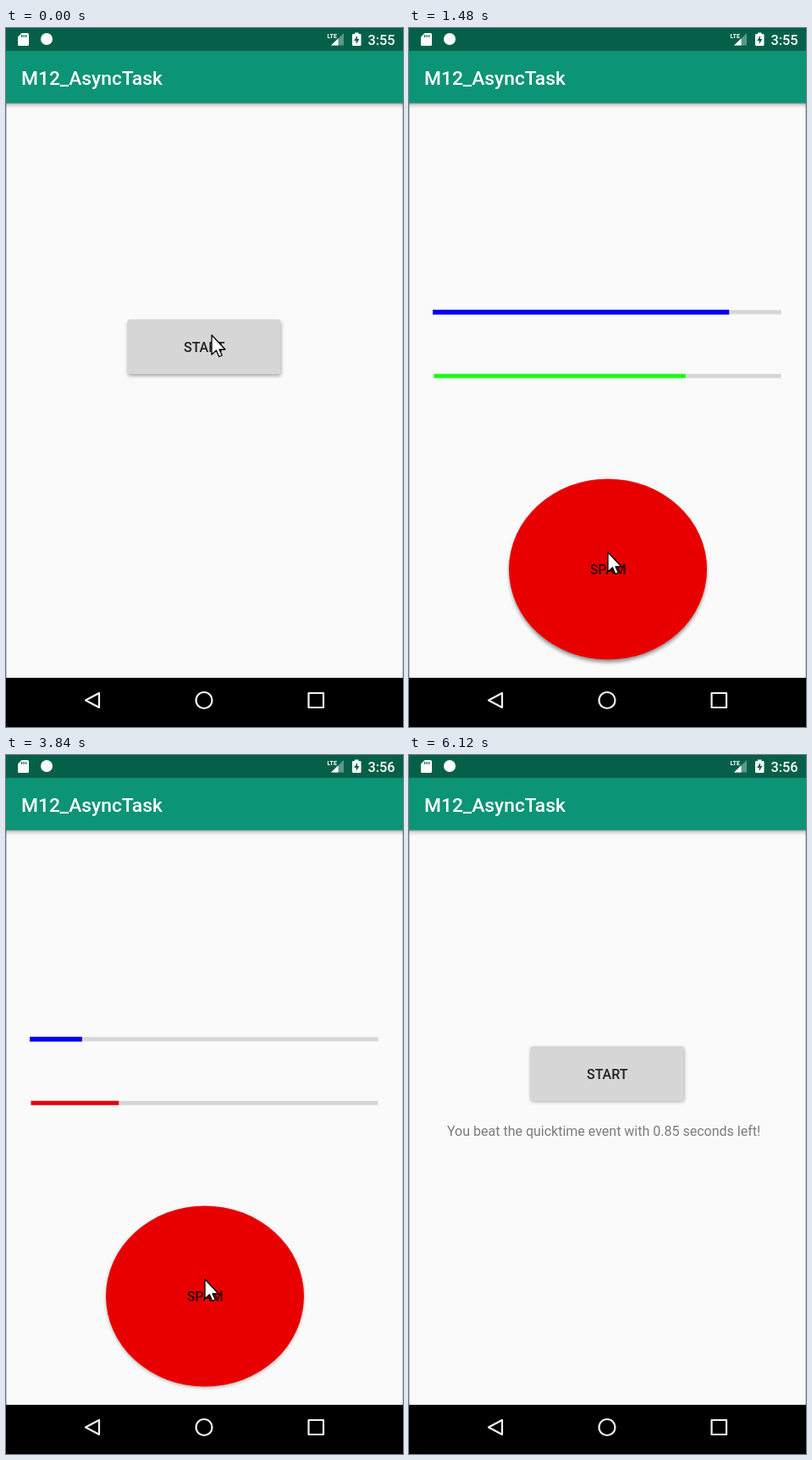
Write an HTML page that moves like this. It is 469 px wide and 824 px high and loops after 6160 ms.

```html
<!DOCTYPE html>
<html lang="en">
<head>
<meta charset="utf-8">
<title>AsyncTask demo</title>
<style>
  html, body { margin: 0; width: 100%; height: 100%; overflow: hidden; background: #fafafa; }
  svg { display: block; width: 469px; height: 824px; font-family: Roboto, sans-serif; }
  .medium { font-weight: 500; }
  .button { font-size: 16px; font-weight: 500; text-anchor: middle; }
</style>
</head>
<body>
<svg viewBox="0 0 469 824">
  <defs>
    <linearGradient id="fade" x2="0" y2="1">
      <stop stop-opacity=".42"/>
      <stop offset=".4" stop-opacity=".13"/>
      <stop offset="1" stop-opacity="0"/>
    </linearGradient>
    <filter id="blur" x="-10%" y="-10%" width="120%" height="120%"><feGaussianBlur stdDeviation="2"/></filter>
  </defs>

  <rect width="469" height="824" fill="#fafafa"/>
  <path d="M.5 88V766M468.5 88V766" stroke="#c4c4c4"/>

  <g id="home">
    <rect id="startShadow" x="144" y="346" width="181" height="63" rx="2" opacity=".35" filter="url(#blur)"/>
    <rect x="143.5" y="343.5" width="181" height="64.5" rx="2" fill="#d6d6d6"/>
    <text class="button" x="234.3" y="382" fill="#202020">START</text>
    <text id="result" x="45" y="449" font-size="16" fill="#7b7b7b">You beat the quicktime event with 0.85 seconds left!</text>
  </g>

  <g id="game">
    <path d="M28 335H439.5M29.5 410.2H439.5" stroke="#d6d6d6" stroke-width="5"/>
    <rect id="clicks" x="28" y="332.2" height="5.6" fill="#0500ef"/>
    <rect id="timer" x="29.5" y="407.7" height="5"/>
    <ellipse id="spamShadow" cx="235" cy="640" rx="116.5" ry="106" filter="url(#blur)"/>
    <ellipse cx="235" cy="638" rx="117" ry="106.5" fill="#e80000"/>
    <text class="button" x="235.3" y="644" fill="#300000">SPAM</text>
  </g>

  <rect y="88" width="469" height="7" fill="url(#fade)"/>
  <rect width="469" height="88.5" fill="#0c9476"/>
  <rect width="469" height="27" fill="#066049"/>
  <g fill="#fff">
    <text class="medium" x="18" y="67" font-size="22.8">M12_AsyncTask</text>
    <path d="M18.5 6H25.5Q27 6 27 7.5V19.5Q27 21 25.5 21H15.5Q14 21 14 19.5V10.5Z"/>
    <path d="M18.7 8v3M21.2 8v3M23.7 8v3" stroke="#066049" stroke-width="1.2"/>
    <circle cx="48" cy="13" r="7"/>
    <text x="379.5" y="12" font-size="7" font-weight="700">LTE</text>
    <path d="M384 20.5H399V6Z" opacity=".35"/>
    <path d="M384 20.5H392.5V12.2Z"/>
    <path d="M412 5.5H416.5V7H418.2Q419.5 7 419.5 8.2V19.8Q419.5 21 418.2 21H410.3Q409 21 409 19.8V8.2Q409 7 410.3 7H412Z"/>
    <path d="M415 9L411.2 15H413.7V19L417.4 13H415Z" fill="#066049"/>
    <text class="medium" id="clock" x="427.5" y="20" font-size="16.3"></text>
  </g>

  <rect y="766" width="469" height="58"/>
  <g fill="none" stroke="#f2f2f2" stroke-width="2.2" stroke-linejoin="round">
    <path d="M94 792.5L110 784V801Z"/>
    <circle cx="234" cy="792.5" r="9.5"/>
    <rect x="357.5" y="784" width="17.5" height="17"/>
  </g>

  <path id="cursor" d="M0 0V23L5.4 18L8.8 25.5L12.3 24L9 17H16Z" fill="#fff" stroke="#000" stroke-width="1.3" stroke-linejoin="round"/>
</svg>

<script>
const LOOP = 6160, FRAME = 40;
const START = 105, LIMIT = 5000, END = 4240;
const FIRST_CLICK = 1080, CLICK_GAP = 166, CLICKS = 20;
const BAR = 412, TIMER_BAR = 410;

// Cursor stops: time, x, y
const path = [[160, 243, 362], [400, 225, 535], [760, 235, 618]];

const part = {};
document.querySelectorAll('svg [id]').forEach(el => part[el.id] = el);

const clamp = v => Math.max(0, Math.min(1, v));
const set = (el, attrs) => { for (const key in attrs) el.setAttribute(key, attrs[key]); };
const show = (el, on) => set(el, { visibility: on ? 'visible' : 'hidden' });

function cursorAt(t) {
  let [, x, y] = path[0];
  for (let i = 1; i < path.length; i++) {
    const [t0, x0, y0] = path[i - 1], [t1, x1, y1] = path[i];
    const u = clamp((t - t0) / (t1 - t0)), ease = u * u * (3 - 2 * u);
    x += (x1 - x0) * ease;
    y += (y1 - y0) * ease;
  }
  return `translate(${x} ${y})`;
}

function draw(t) {
  const playing = t >= START && t < END;
  show(part.home, !playing);
  show(part.game, playing);
  show(part.result, t >= END);
  set(part.startShadow, { y: t < START ? 347 : 345.5 });

  const left = clamp(1 - (t - START) / LIMIT);
  const color = left > 2 / 3 ? '#1aff1a' : left > 1 / 3 ? '#0500ef' : '#e4000c';
  set(part.timer, { width: TIMER_BAR * left, fill: color });

  const beat = (t - FIRST_CLICK) / CLICK_GAP;
  const done = clamp((Math.floor(beat) + 1) / CLICKS);
  set(part.clicks, { width: BAR * (1 - done) });

  // The round button lifts briefly with every tap
  const lift = beat < 0 ? 0 : clamp(1 - Math.abs(beat % 1 - .45) / .15);
  set(part.spamShadow, { cy: 639.5 + 3 * lift, opacity: .35 + .1 * lift });

  part.clock.textContent = t < 2780 ? '3:55' : '3:56';
  set(part.cursor, { transform: cursorAt(t) });
  show(part.cursor, t < 5960);
}

const origin = performance.now();
function tick() {
  const t = (performance.now() - origin) % LOOP;
  draw(Math.floor(t / FRAME) * FRAME);
  requestAnimationFrame(tick);
}
tick();
</script>
</body>
</html>
```
